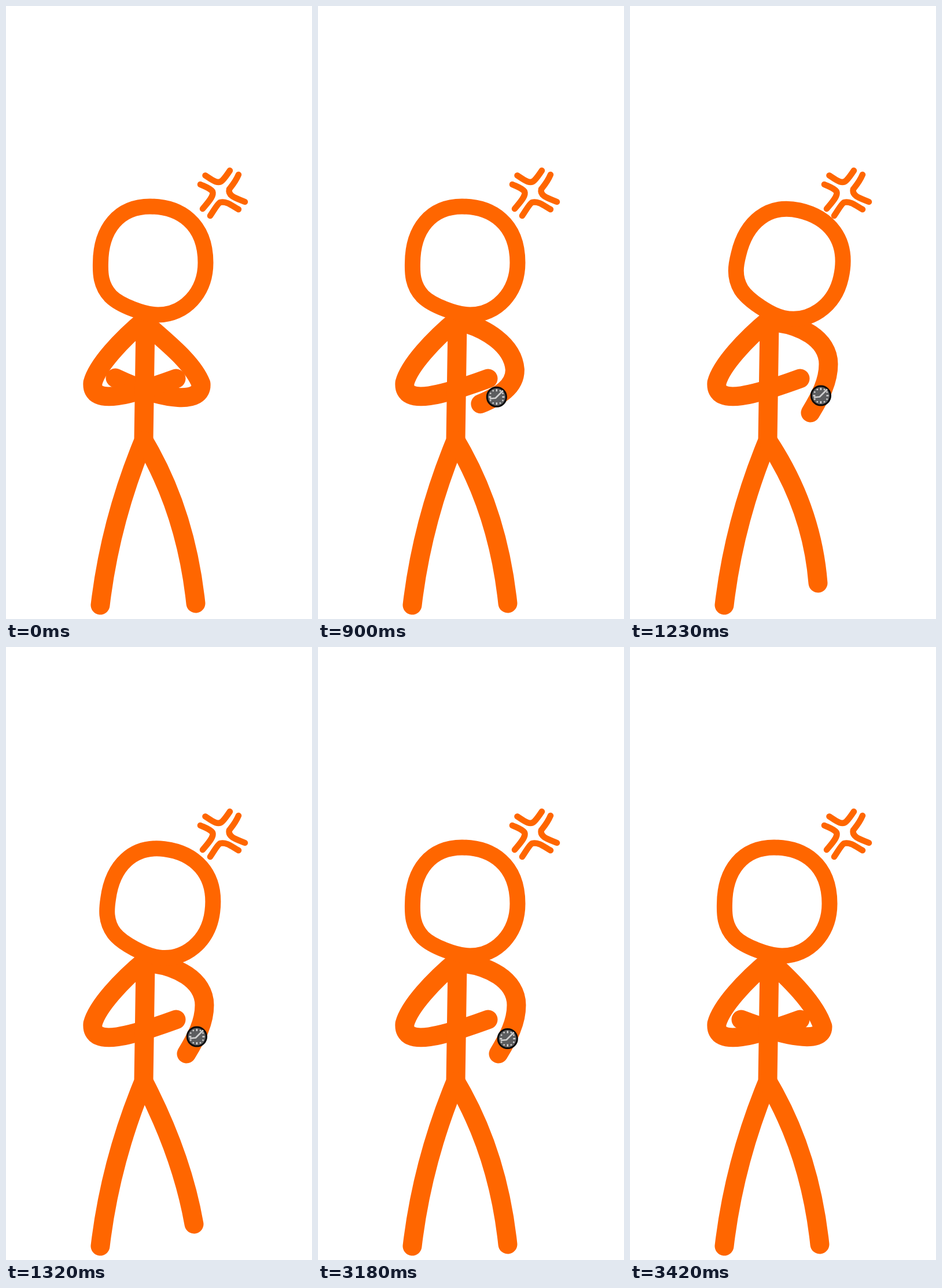
Write an HTML page that moves like this. It is 529x1058 px and loops after 3450 ms.

```html
<!DOCTYPE html>
<html lang="en">
<head>
<meta charset="utf-8">
<title>Impatient stick figure</title>
<style>
html, body { margin: 0; width: 100%; height: 100%; overflow: hidden; background: #fff; }
svg { display: block; width: 100vw; height: 100vh; }
.line { fill: none; stroke: #f60; stroke-width: 33; stroke-linecap: round; stroke-linejoin: round; }
</style>
</head>
<body>
<svg viewBox="0 0 529 1058">
  <g class="line">
    <path id="arm"/>
  </g>
  <g id="watch">
    <circle r="16.6" fill="#5c5d5f" stroke="#0b0b0b" stroke-width="3"/>
    <g id="ticks" stroke="#d6d6d6" stroke-width="2.4"></g>
    <path d="M-12 3 L-2 2 L11 -11" fill="none" stroke="#d0d0d0" stroke-width="2.6" stroke-linejoin="round"/>
  </g>
  <g class="line">
    <path d="M240 542 C200 575 158 620 150 650 C146 693 220 670 294 643"/>
    <path d="M241 548 L238 750 Q180 890 163 1034"/>
    <path id="leg"/>
    <path id="head" stroke-width="27" d="M249 346 C300 346 345 375 345 443 C345 495 308 533 263 533
      C240 533 197 517 181 501 C163 482 163 460 163.5 443 C164 385 195 346 249 346 Z"/>
    <path stroke-width="10.5" d="M344.500 292.500 C355 299 366 309 374 301 C379 296 383 290 387 284
      M402 291 C397 303 390 311 386 316 C383 328 398 332 413 338
      M336 308 C345 312 352 314 357 320 C360 328 350 338 340 350
      M353 362 C360 352 365 342 370 339 C382 336 392 346 402 351"/>
  </g>
</svg>
<script>
const LOOP = 3450, TICK = 30;
const $ = id => document.getElementById(id);

// Arm: shoulder, two handles, elbow, two handles, hand
const TUCKED = [238, 545, 270, 575, 322, 613, 337, 652, 340, 686, 278, 684, 189, 642];
const CROSSED = [240, 540, 275, 572, 320, 615, 333, 655, 334, 687, 265, 671, 192, 643];
const RAISED = [240, 545, 295, 548, 343, 575, 343, 618, 343, 648, 329, 674, 312, 702];

// Leg: bend and foot
const STAND = [311, 872, 328, 1031];
const LIFT = [325, 852, 325, 996];
const STRETCH = [304, 877, 325, 996];

const clamp = x => Math.min(1, Math.max(0, x));
const span = (t, a, b) => clamp((t - a) / (b - a));
const ease = x => x * x * (3 - 2 * x);
const mix = (a, b, k) => a.map((v, i) => v + (b[i] - v) * k);

for (let i = 0; i < 12; i++) {
  const tick = document.createElementNS("http://www.w3.org/2000/svg", "path");
  tick.setAttribute("d", i % 3 ? "M0 -11 V-13.500" : "M0 -9.500 V-13.500");
  tick.setAttribute("transform", `rotate(${i * 30})`);
  $("ticks").append(tick);
}

function drawArm(t) {
  const up = ease(span(t, 720, 990)) * (1 - ease(span(t, 3180, 3420)));
  const p = t < 720 ? TUCKED : mix(CROSSED, RAISED, up);
  $("arm").setAttribute("d", `M${p.slice(0, 2)} C${p.slice(2, 8)} C${p.slice(8)}`);

  const still = t >= 990 && t < 3180;
  const dx = p[10] - p[12], dy = p[11] - p[13];
  const reach = (still ? 34.5 : 30.4) / Math.hypot(dx, dy);
  const x = p[12] + dx * reach, y = p[13] + dy * reach;
  $("watch").setAttribute("transform", `translate(${x} ${y})`);
  $("watch").setAttribute("visibility", up > 0.15 ? "visible" : "hidden");
}

function drawTap(t) {
  const tapping = t >= 1140 && t < 1500;
  const nod = t < 1240 ? ease(span(t, 1140, 1240)) : 1 - ease(span(t, 1240, 1410));
  const step = t < 1330
    ? mix(LIFT, STRETCH, ease(span(t, 1140, 1320)))
    : mix(STRETCH, STAND, ease(span(t, 1350, 1500)));
  const [bx, by, fx, fy] = tapping ? step : STAND;
  $("leg").setAttribute("d", `M238 750 Q${bx} ${by} ${fx} ${fy}`);
  $("head").setAttribute("transform", `rotate(${13 * nod} 240 545)`);
}

function draw(now) {
  const t = Math.floor((now % LOOP) / TICK) * TICK;
  drawArm(t);
  drawTap(t);
}

function loop() {
  draw(performance.now());
  requestAnimationFrame(loop);
}
loop();
</script>
</body>
</html>
```
